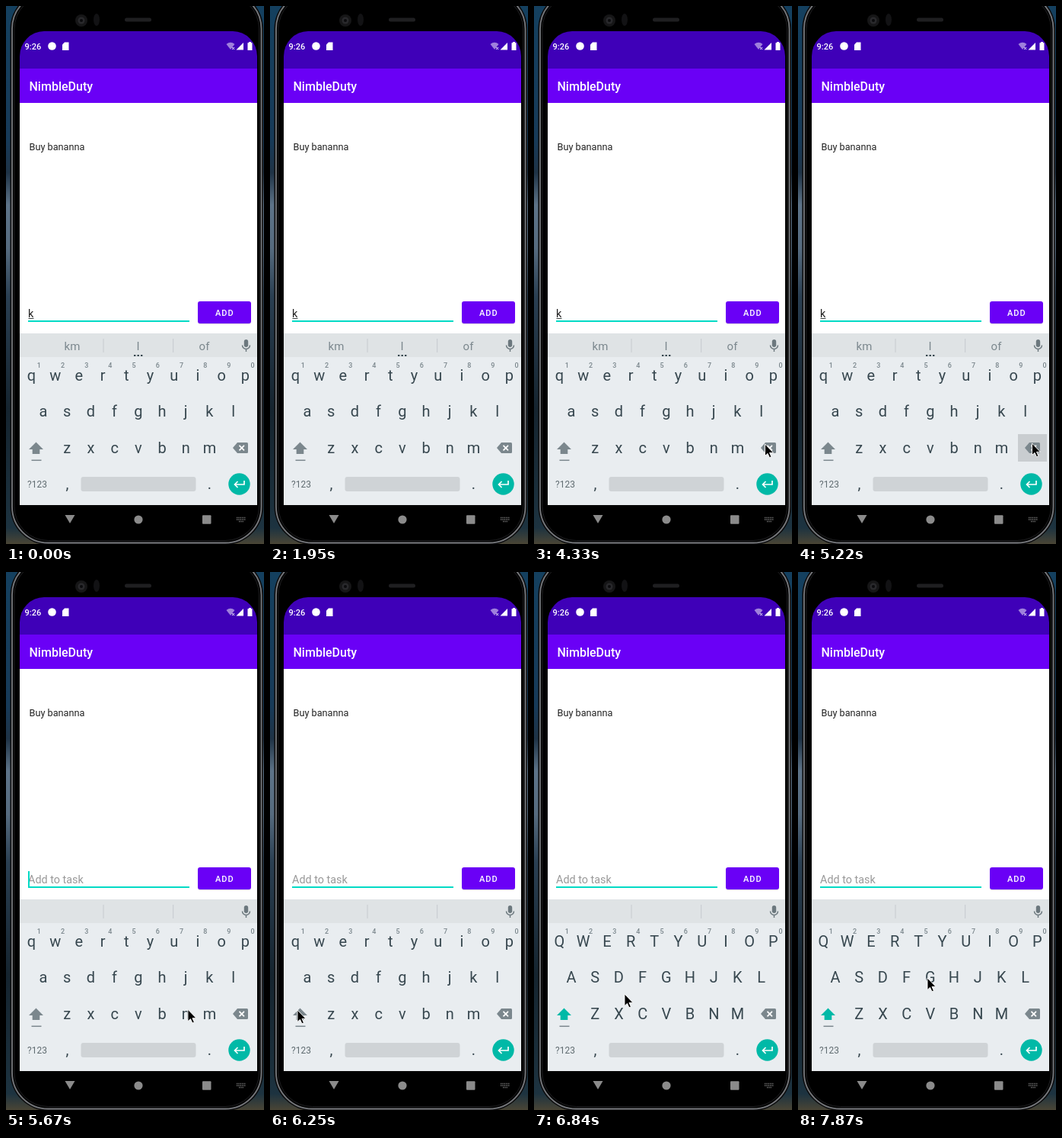
These frames come from a looping animation (339x705 px, 8000 ms). An HTML page:

```html
<!DOCTYPE html>
<html lang="en">
<head>
<meta charset="utf-8">
<title>Todo app</title>
<style>
  html, body { margin: 0; width: 100%; height: 100%; overflow: hidden; background: #000; }
  svg { display: block; width: 339px; height: 705px; font-family: Roboto, sans-serif; }
  .key { font-size: 20px; fill: #37474f; text-anchor: middle; }
  .digit { font-size: 9px; font-weight: 500; fill: #7a868c; text-anchor: middle; }
  .hint { font-size: 15px; fill: #7c888e; text-anchor: middle; }
</style>
</head>
<body>
<svg viewBox="0 0 339 705">
  <defs>
    <linearGradient id="photo" x2="0" y2="1">
      <stop offset="0" stop-color="#14405f"/>
      <stop offset=".25" stop-color="#173a58"/>
      <stop offset=".31" stop-color="#1f3346"/>
      <stop offset=".37" stop-color="#5d7388"/>
      <stop offset=".45" stop-color="#566b7f"/>
      <stop offset=".54" stop-color="#2a3f52"/>
      <stop offset=".75" stop-color="#15242f"/>
      <stop offset=".97" stop-color="#1d3340"/>
      <stop offset="1" stop-color="#4a4535"/>
    </linearGradient>
    <clipPath id="screen"><path d="M18 654V66a32 33 0 0 1 32-33H298a32 33 0 0 1 32 33V654Z"/></clipPath>
  </defs>

  <!-- Phone body -->
  <rect width="339" height="705" fill="url(#photo)"/>
  <rect x="5.500" y="-20" width="332.500" height="726" rx="50" fill="#0c0c0d"/>
  <rect x="8" y="-17.500" width="327.500" height="721" rx="47.500" fill="#050505" stroke="#77797d" stroke-width="1.800"/>
  <rect x="11" y="-14.500" width="321.500" height="715" rx="44.500" fill="#000" stroke="#1d1d1f"/>
  <circle cx="99" cy="19" r="8" fill="#161617"/>
  <circle cx="99" cy="19" r="4.500" fill="#29292c"/>
  <circle cx="99" cy="19" r="2" fill="#0b0b0d"/>
  <ellipse cx="119" cy="18" rx="4" ry="8" fill="#121214"/>
  <rect x="156" y="15.500" width="35" height="5" rx="2.500" fill="#1f1f21"/>

  <!-- Screen -->
  <g clip-path="url(#screen)">
    <path fill="#fff" d="M18 127H330V429H18Z"/>
    <path fill="#3f00b8" d="M18 33H330V82H18Z"/>
    <path fill="#6a00f6" d="M18 82H330V127H18Z"/>
    <path fill="#dfe3e5" d="M18 429H330V460H18Z"/>
    <path fill="#e9edf0" d="M18 460H330V654H18Z"/>
  </g>

  <!-- Status bar -->
  <g fill="#fff">
    <text x="24.500" y="57" font-size="11" font-weight="500">9:26</text>
    <circle cx="60.500" cy="52.500" r="5.300"/>
    <path d="M77 47.500h5.500v10.500h-8.500v-7.500Z"/>
    <path opacity=".5" d="M289.500 50q5.500-4.500 11 0l-5.500 7Z"/>
    <path d="M297 54l3 3m0-3l-3 3" stroke="#fff"/>
    <path d="M312 48v9.500h-9.500Z"/>
    <path d="M319 47h3v1.300h1.500v9.700h-6v-9.700h1.500Z"/>
  </g>

  <text x="30.500" y="111" font-size="16" font-weight="500" fill="#fff">NimbleDuty</text>
  <text x="30.500" y="189" font-size="12.700" fill="#222">Buy bananna</text>

  <!-- Entry row -->
  <text id="entry" x="29" y="408" font-size="14.400"></text>
  <path id="mark" d="M29.500 409.500h7" stroke="#444"/>
  <path fill="#03dac5" d="M29 412h212v2h-212Z"/>
  <rect id="caret" y="392" width="2" height="20" fill="#03dac5"/>
  <rect x="252" y="388" width="70" height="29" rx="3" fill="#000" opacity=".12"/>
  <rect x="252" y="387" width="70" height="29" rx="3" fill="#6a00f6"/>
  <text x="275" y="405.500" font-size="11" font-weight="500" letter-spacing="1" fill="#fff">ADD</text>

  <!-- Suggestions -->
  <path d="M128 436v18m91.700-18v18" stroke="#c6cbce"/>
  <g id="hints" class="hint">
    <text x="87" y="451">km</text><text x="173.500" y="451">I</text><text x="260.500" y="451">of</text>
    <path fill="#37474f" d="M168 457h2.400v2h-2.400Zm4.500 0h2.400v2h-2.400Zm4.500 0h2.400v2h-2.400Z"/>
  </g>
  <rect x="312.800" y="437" width="5.400" height="10" rx="2.700" fill="#6c787e"/>
  <path d="M310.500 444.500a5 5 0 0 0 10 0M315.500 449.500v3.500" fill="none" stroke="#6c787e" stroke-width="1.500"/>

  <!-- Keyboard -->
  <path id="pressed" fill="#c9cdd0"/>
  <g id="keys"></g>
  <path id="shift" d="M39.500 571.500l9.500 9.500h-4.700v6h-9.600v-6H30Z"/>
  <path d="M33.500 595.300h13" stroke="#7b878d" stroke-width="1.500"/>
  <path fill="#7b878d" d="M304 572h12.500q1.500 0 1.500 1.500v11q0 1.500-1.500 1.500H304l-6-7Z"/>
  <path d="M306.500 575.800l6.500 6.500m0-6.500l-6.500 6.500" stroke="#fff" stroke-width="1.700"/>
  <text x="41" y="631" font-size="12" fill="#5f6b70" text-anchor="middle">?123</text>
  <text class="key" x="80.500" y="633">,</text>
  <rect x="98.500" y="617" width="151" height="19" rx="3" fill="#cfd3d6"/>
  <text class="key" x="267.500" y="633">.</text>
  <circle cx="306.500" cy="626.500" r="14.200" fill="#00b9a7"/>
  <path d="M313 622v5h-12.500m4-4l-4 4 4 4" fill="none" stroke="#fff" stroke-width="1.700"/>

  <!-- Navigation bar -->
  <g fill="#8b8b8b">
    <path d="M77.500 667h13l-6.500 11Z"/>
    <circle cx="174" cy="673" r="5.600"/>
    <rect x="258" y="667.300" width="11.500" height="11.500" rx="1"/>
    <path d="M303 670.500h12m-12 2.500h12m-9 2.500h6" stroke="#777" stroke-width="1.300" stroke-dasharray="1.300 1"/>
  </g>

  <path id="pointer" d="M0 0V15.500L3.500 12.400 6 17.800 8.400 16.700 6 11.400H11Z" stroke="#fff" stroke-width=".9"/>
</svg>
<script>
const $ = id => document.getElementById(id);
const LOOP = 8000, TICK = 147.4, ENTER = 3890, ERASE = 5370, CAPS = 6550;
const caretFlips = [450, 900, 1350, 1950, 2400, 3000, 3440, 3890, 4480, 4930,
                    5370, 5960, 6400, 6840, 7430, 7870];
// Pointer stops: time, x, y
const stops = [[3890, 334, 572], [4330, 303.5, 574], [4630, 307.5, 573], [5370, 307.5, 573], [6250, 36, 574],
               [6550, 36, 574], [6840, 119, 553], [7430, 163, 540], [7870, 170, 532]];

const letters = [];
function addText(kind, x, y, text) {
  const node = document.createElementNS("http://www.w3.org/2000/svg", "text");
  node.setAttribute("class", kind);
  node.setAttribute("x", x);
  node.setAttribute("y", y);
  node.textContent = text;
  $("keys").append(node);
  return node;
}
[["qwertyuiop", 33.5, 491], ["asdfghjkl", 49, 538], ["zxcvbnm", 80.3, 586]].forEach(([row, left, y]) =>
  [...row].forEach((char, i) => letters.push([addText("key", left + 31.2 * i, y, char), char])));
[..."1234567890"].forEach((digit, i) => addText("digit", 43.3 + 31.2 * i, 474, digit));

const show = (id, on) => $(id).setAttribute("visibility", on ? "visible" : "hidden");
const ease = u => u * u * (3 - 2 * u);

function pointerAt(t) {
  const i = stops.findIndex(stop => stop[0] > t);
  if (i < 0) return stops.at(-1).slice(1);
  if (i === 0) return stops[0].slice(1);
  const [t0, x0, y0] = stops[i - 1], [t1, x1, y1] = stops[i];
  const k = ease((t - t0) / (t1 - t0));
  return [x0 + (x1 - x0) * k, y0 + (y1 - y0) * k];
}

function draw(t) {
  const typed = t < ERASE, caps = t >= CAPS;
  $("entry").textContent = typed ? "k" : "Add to task";
  $("entry").setAttribute("fill", typed ? "#222" : "#999");
  show("mark", typed);
  show("hints", typed);
  show("caret", caretFlips.filter(time => time <= t).length % 2);
  $("caret").setAttribute("x", typed ? 36 : 29);

  for (const [node, char] of letters) node.textContent = caps ? char.toUpperCase() : char;
  $("shift").setAttribute("fill", caps ? "#00b9a7" : "#7b878d");
  const erasing = t >= 5220 && t < ERASE, shifting = t >= 6400 && t < CAPS;
  show("pressed", erasing || shifting);
  $("pressed").setAttribute("d", `M${shifting ? 21 : 289} 561h38v36h-38Z`);

  // The pointer is sampled at a fixed tick, so it moves in steps.
  const sampled = ENTER + Math.floor((t - ENTER) / TICK + 0.05) * TICK;
  show("pointer", t >= ENTER);
  $("pointer").setAttribute("transform", `translate(${pointerAt(sampled)})`);
}

const start = performance.now();
function tick() {
  draw((performance.now() - start) % LOOP);
  requestAnimationFrame(tick);
}
tick();
</script>
</body>
</html>
```
